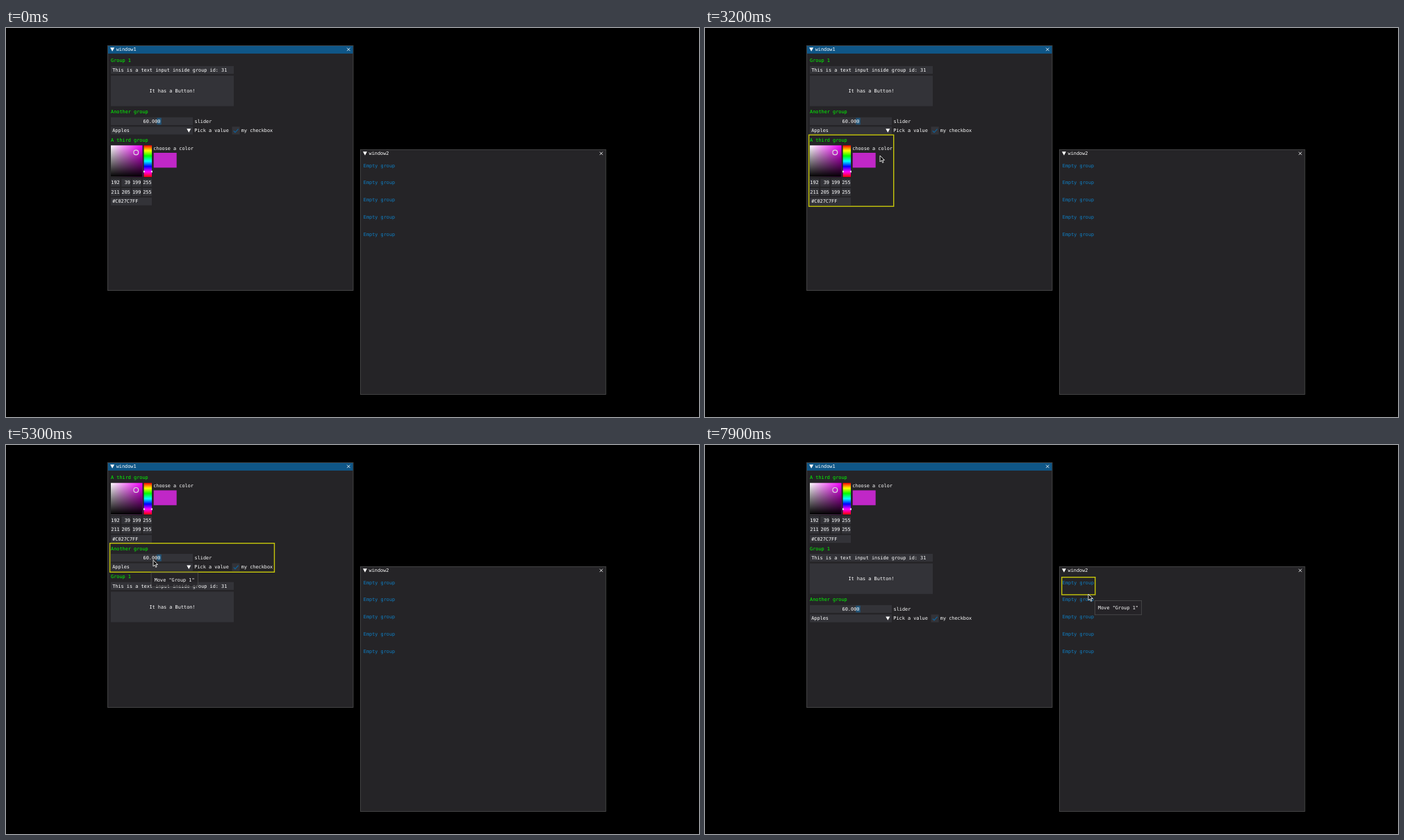
Animation of 998 by 561 pixels, one loop 8000 ms. Source, as an HTML page:

```html
<!DOCTYPE html>
<html lang="en">
<head>
<meta charset="utf-8">
<title>Reorder groups</title>
<style>
  html, body { margin: 0; width: 100%; height: 100%; overflow: hidden; background: #000; }
  svg { display: block; width: 100%; height: 100%; }
  text {
    font: 6.87px "DejaVu Sans Mono", "Liberation Mono", monospace;
    text-rendering: geometricPrecision; white-space: pre; fill: #fff;
  }
  .mid { text-anchor: middle; }
  .title { fill: #0f0; }
  .empty { fill: #0f7fc4; }
  .win, .box { fill: #252427; stroke: #4e4e4f; stroke-width: .8; }
  .bar { fill: #0f5687; }
  .field { fill: #333338; }
  .hot { fill: #225376; }
  .white { fill: #fff; }
  .close { stroke: #fff; stroke-width: .8; }
  .check { fill: none; stroke: #145c8e; stroke-width: 1.4; }
  .swatch { fill: #c027c7; }
  .ring { fill: #c027c7; stroke: #ddd; stroke-width: 1.2; }
  #outline { fill: none; stroke: #c6c60b; stroke-width: 1.4; }
  #cursor { fill: #151515; stroke: #fff; stroke-width: .8; }
</style>
</head>
<body>
<svg viewBox="0 0 998 561" preserveAspectRatio="none">
  <defs>
    <linearGradient id="sat"><stop stop-color="#fff"/><stop offset="1" stop-color="hsl(298 100% 50%)"/></linearGradient>
    <linearGradient id="val" x2="0" y2="1"><stop stop-opacity="0"/><stop offset="1"/></linearGradient>
    <linearGradient id="hue" x2="0" y2="1"></linearGradient>
  </defs>
  <g id="scene"></g>
  <rect id="outline"/>
  <g id="tip"></g>
  <path id="cursor" d="M0 0V9L2.2 7 3.7 10.3 5.1 9.7 3.7 6.5H6.5Z"/>
</svg>
<script>
const $ = id => document.getElementById(id);
const LOOP = 8000, STEP = 100;
const CHAR = 4.135, PAD = 4.7;
const LEFT = 151, FIELD = 11.2, ROW = 13.55, GAP = 6.3, RIM = 7.8;

// Vertical positions of text are line centres.
const text = (x, y, s, cls = "") => `<text class="${cls}" x="${x}" y="${y + 2.3}">${s}</text>`;
const rect = (x, y, w, h, cls, extra = "") =>
  `<rect class="${cls}" x="${x}" y="${y}" width="${w}" height="${h}" ${extra}/>`;
const arrow = (x, y) => `<path class="white" d="M${x - 3} ${y - 2.6}h6l-3 5.4z"/>`;

const rowTop = i => RIM + ROW * i;
const rowMid = i => rowTop(i) + FIELD / 2;
const field = (row, w, s = "", x = LEFT) =>
  rect(x, rowTop(row), w, FIELD, "field") + text(x + 2.2, rowMid(row), s);

function win(x, y, name, active) {
  return rect(x, y, 353.5, 353, "win") +
    (active ? rect(x + .4, y + .4, 352.7, 11, "bar") : "") +
    arrow(x + 6.6, y + 5.4) + text(x + 12.2, y + 5.5, name) +
    `<path class="close" d="M${x + 344.6} ${y + 3.2}l4.4 4.4m0-4.4l-4.4 4.4"/>`;
}

function picker() {
  const size = 45.5, y = 7.6;
  const shade = (x, w, id) => rect(x, y, w, size, "", `fill="url(#${id})"`);
  const numbers = ["192  39199255", "211205199255"].map((s, r) =>
    s.replace("  39", " 39").match(/.{3}/g).map((n, i) => {
      const x = LEFT + 15.3 * i, row = 3.54 + r;
      return field(row, 13.2, "", x) + text(x + 6.5, rowMid(row), n, "mid");
    }).join("")).join("");
  return shade(LEFT, size, "sat") + shade(LEFT, size, "val") + shade(198.6, 11.4, "hue") +
    '<circle class="ring" cx="187.3" cy="17.8" r="3.4"/>' +
    '<path class="white" d="M198 43.7v3.4l2.4-1.7zM210.8 43.7v3.4l-2.4-1.7z"/>' +
    text(212.2, 11.9, "choose a color") + rect(212.7, 18.3, 33, 21.4, "swatch") +
    numbers + field(5.54, 59, "#C027C7FF");
}

$("hue").innerHTML = Array.from({ length: 7 },
  (_, i) => `<stop offset="${i / 6}" stop-color="hsl(${i * 60} 100% 50%)"/>`).join("");

const button = { top: 21.6, width: 177, height: 44 };
const groups = [
  {
    name: "Group 1", bottom: 67.6, right: 330.2,
    body: field(0, button.width, "This is a text input inside group id: 31") +
      rect(LEFT, button.top, button.width, button.height, "field", 'id="button"') +
      text(LEFT + button.width / 2, button.top + button.height / 2, "It has a Button!", "mid")
  },
  {
    name: "Another group", bottom: 34.4, right: 386.8,
    body: field(0, 118) + rect(217.3, 8.6, 6.5, 9.8, "hot") + text(210, rowMid(0), "60.000", "mid") +
      text(271.5, rowMid(0), "slider") + field(1, 118, "Apples") + arrow(263.3, rowMid(1)) +
      text(271.3, rowMid(1), "Pick a value") + field(1, FIELD, "", 325.5) +
      '<path class="check" d="M327.8 27.3l2.2 2.3 4.6-5"/>' + text(338.8, rowMid(1), "my checkbox")
  },
  { name: "A third group", bottom: 95.8, right: 272, body: picker() }
];

const emptySlots = Array.from({ length: 5 }, (_, i) => {
  const line = 198.2 + 24.75 * i;
  return { line, x: 513.2, y: line - RIM, right: 562.2, bottom: line + 18 };
});

$("scene").innerHTML = win(146.5, 25.5, "window1", true) + win(510.4, 175.5, "window2", false) +
  groups.map((g, i) => `<g id="group${i}">${text(LEFT, 0, g.name, "title")}${g.body}</g>`).join("") +
  emptySlots.map(s => text(514.8, s.line, "Empty group", "empty")).join("");

// Turning points of the pointer: time, x, y
const route = [
  [100, 529, 292], [500, 330, 40], [900, 160, 44], [1400, 171, 45], [1800, 175, 184],
  [2300, 190, 78], [3200, 252, 184], [3500, 260, 228], [4100, 190, 60], [4500, 175, 186],
  [4600, 169, 194], [5000, 175, 192], [5300, 212, 166], [5500, 266, 188], [5700, 220, 162],
  [5800, 197, 166], [6500, 203, 151], [6600, 227, 155], [7200, 520, 257], [7800, 552, 215]
];
const drags = [
  { start: 2400, end: 3300, from: 0, to: 2 },
  { start: 4900, end: 5500, from: 2, to: 1 },
  { start: 6500, end: LOOP + STEP, from: 1 }
];

function pointer(time) {
  const t = Math.min(Math.max(time, route[0][0]), route.at(-1)[0]);
  const i = Math.max(1, route.findIndex(p => p[0] >= t));
  const [t0, x0, y0] = route[i - 1], [t1, x1, y1] = route[i];
  const k = (t - t0) / (t1 - t0);
  return { x: x0 + (x1 - x0) * k, y: y0 + (y1 - y0) * k };
}

// Every finished drag swaps two slots.
function orderAt(t) {
  const order = [0, 1, 2];
  for (const { end, from, to } of drags)
    if (t >= end) [order[from], order[to]] = [order[to], order[from]];
  return order;
}

const inside = (p, s) => p.x >= s.x && p.x <= s.right && p.y >= s.y && p.y <= s.bottom;

function layout(order) {
  let line = 47.1;
  return order.map(i => {
    const { right, bottom } = groups[i];
    $("group" + i).setAttribute("transform", `translate(0 ${line})`);
    const slot = { line, x: 149, y: line - RIM, right, bottom: line + bottom };
    line += bottom + GAP;
    return slot;
  });
}

function tooltip(p, lines, dragging) {
  const x = p.x + 9.4, y = p.y + 9.4;
  const w = Math.max(...lines.map(s => s.length)) * CHAR + 2 * PAD;
  const h = 20.4 + ROW * (lines.length - 1);
  return rect(x, y, w, h, "box", dragging ? 'fill-opacity=".6"' : "") +
    lines.map((s, i) => text(x + PAD, y + 10.2 + ROW * i, s)).join("");
}

function showOutline(slot) {
  const outline = $("outline");
  outline.style.display = slot ? "" : "none";
  if (!slot) return;
  outline.setAttribute("x", slot.x + .6);
  outline.setAttribute("y", slot.y + .3);
  outline.setAttribute("width", slot.right - slot.x - .9);
  outline.setAttribute("height", slot.bottom - slot.y - .6);
}

function draw(t) {
  const order = orderAt(t);
  const slots = layout(order);
  const mouse = pointer(t);
  const seen = pointer(t - STEP); // the panels trail the pointer by one step
  const drag = drags.find(d => t >= d.start && t < d.end);
  const hover = slots.findLastIndex(s => inside(seen, s));

  const lines = [];
  if (drag && t < drag.end - STEP) lines.push('Move "Group 1"');
  const hinting = drag ? t < drag.start + 2 * STEP : t >= 1500;
  if (hover >= 0 && hinting) lines.push(`Drag to reorder group "${groups[hover].name}"`);
  $("tip").innerHTML = lines.length ? tooltip(seen, lines, drag) : "";

  const targets = [...slots, ...emptySlots];
  showOutline(drag && targets.findLast(s => s !== slots[drag.from] && inside(seen, s)));

  const y = slots[order.indexOf(0)].line + button.top;
  const area = { x: LEFT, y, right: LEFT + button.width, bottom: y + button.height };
  const hot = !drag && t >= 1000 && inside(pointer(t - 2 * STEP), area);
  $("button").setAttribute("class", hot ? "hot" : "field");

  $("cursor").style.display = t < route[0][0] ? "none" : "";
  $("cursor").setAttribute("transform", `translate(${mouse.x} ${mouse.y})`);
}

let last = -1;
function tick() {
  const t = Math.floor(performance.now() % LOOP / STEP) * STEP;
  if (t !== last) draw(last = t);
  requestAnimationFrame(tick);
}
tick();
</script>
</body>
</html>
```
